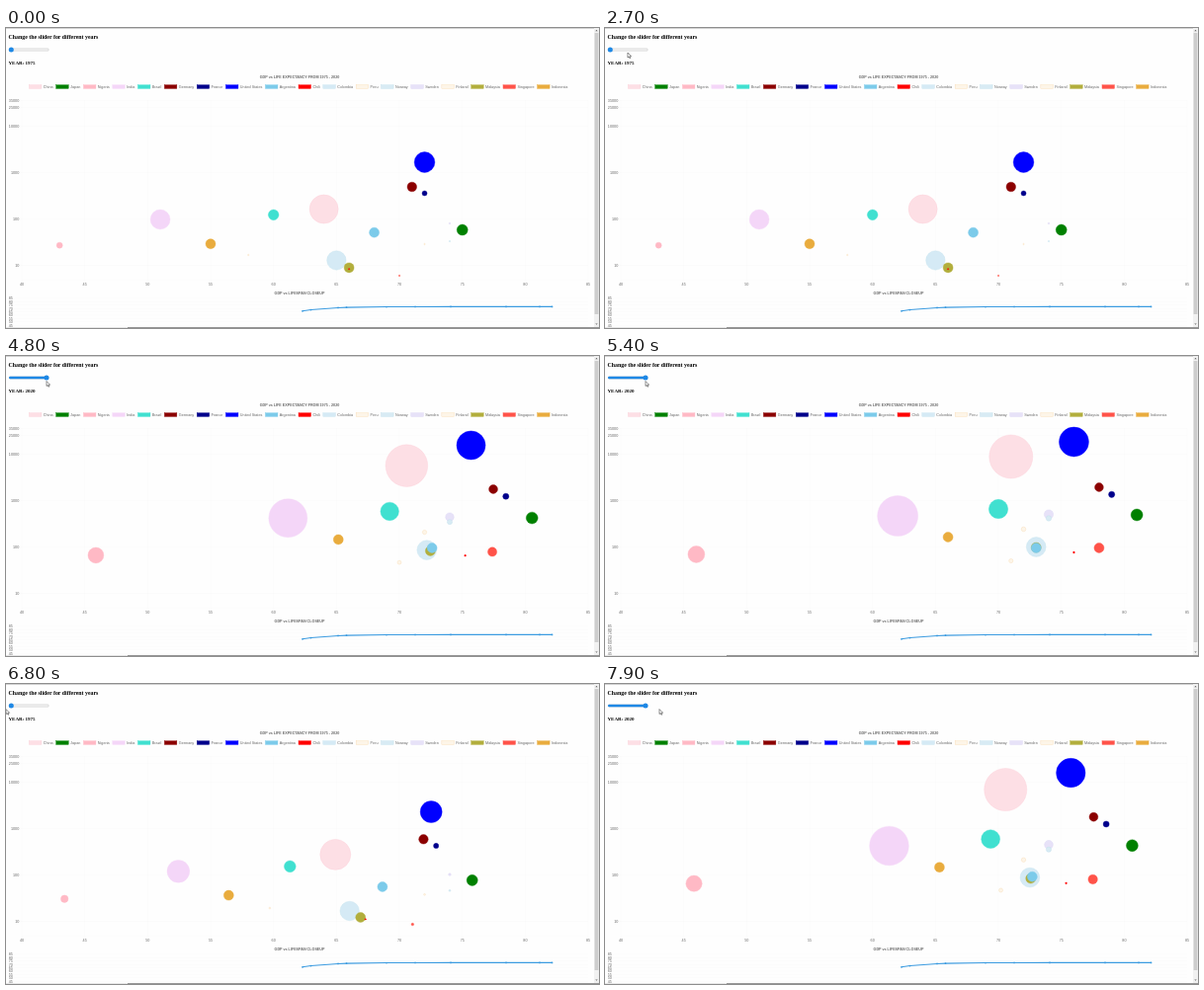
These frames come from a looping animation (600 by 304 pixels, 8000 ms). An HTML page:

```html
<!DOCTYPE html>
<html lang="en">
<head>
<meta charset="utf-8">
<title>GDP vs life expectancy</title>
<style>
html, body { margin: 0; width: 100%; height: 100%; overflow: hidden; background: #fefefe; }
svg { display: block; width: 600px; height: 304px; font: 3.75px "Liberation Sans", Arial, sans-serif; fill: #666; }
.head, .year { font: bold 5.88px "Liberation Serif", "Times New Roman", serif; fill: #000; }
.year { font-size: 5px; }
.title { font-weight: bold; font-size: 3.7px; text-anchor: middle; }
.mid { text-anchor: middle; }
.end { text-anchor: end; }
</style>
</head>
<body>
<svg id="stage" viewBox="0 0 600 304"></svg>
<script>
const LOOP = 8000;
const stage = document.getElementById('stage');

function add(tag, attrs, parent = stage) {
  const node = document.createElementNS('http://www.w3.org/2000/svg', tag);
  for (const key in attrs) node.setAttribute(key, attrs[key]);
  parent.append(node);
  return node;
}
function text(x, y, str, cls = '') {
  const node = add('text', { x, y, class: cls });
  node.textContent = str;
  return node;
}
const rect = (x, y, width, height, fill, more) => add('rect', { x, y, width, height, fill, ...more });
const line = (x1, y1, x2, y2) => add('line', { x1, y1, x2, y2, stroke: '#000', 'stroke-opacity': .04, 'stroke-width': .31 });

const lifeX = life => 16 + 12.735 * (life - 40);
const gdpY = gdp => 287.6 - 47.1 * Math.log10(gdp);
const mix = (a, b, p) => a + (b - a) * p;

// name, fill, border, then 1975 and 2020 values of life expectancy, GDP and radius,
// and optionally how far life and GDP have come by 1995
const countries = [
  ['China', '#fddfe5', '#fbcdd6', [64, 71], [162, 8730], [14.5, 22], [.53, .13]],
  ['Japan', '#008000', '', [75, 81], [58, 487], [5.5, 6]],
  ['Nigeria', '#ffb9c5', '', [43, 46], [27, 69], [3, 8.5], [.7, .6]],
  ['India', '#f4d6f8', '', [51, 62], [97, 464], [10, 20.5]],
  ['Brazil', '#40e0d0', '', [60, 70], [122, 653], [5.3, 9.7]],
  ['Germany', '#8b0000', '', [71, 78], [487, 1916], [4.8, 4.4]],
  ['France', '#00008b', '', [72, 79], [355, 1341], [2.5, 3.1]],
  ['United States', '#0000ff', '', [72, 76], [1655, 18155], [10.4, 15]],
  ['Argentina', '#7ccbea', '', [68, 73], [51, 95], [5, 5], [.37, .94]],
  ['Chili', '#ff0000', '', [66, 76], [8.3, 76], [.7, .9]],
  ['Colombia', '#d5eaf5', '#c5e2ee', [65, 73], [12.8, 99.6], [9.7, 9.9], [.2, .42]],
  ['Peru', '#fdf5e8', '#f7d9b0', [58, 71], [16.7, 50], [.7, 2.1]],
  ['Norway', '#d8ebf4', '#c0dfea', [74, 74], [33, 411], [.7, 2.7]],
  ['Sweden', '#e7e2f8', '#dad3f2', [74, 74], [80, 500], [.8, 4.6]],
  ['Finland', '#fdf5e8', '#f7d9b0', [72, 72], [28.6, 240], [.7, 2.3]],
  ['Malaysia', '#b2ae3c', '', [66, 73], [8.9, 97], [5, 5]],
  ['Singapore', '#ff5349', '', [70, 78], [6, 95], [.7, 5]],
  ['Indonesia', '#e9ac3e', '', [55, 66], [29, 162], [5, 5]]
];

// page frame
rect(0, 0, 600, .6, '#bbb');
rect(595, 0, 5, 304, '#f1f1f1');
rect(595.6, 5, 3.8, 285, '#cdcdcd');
add('path', { d: 'M596.3 3.2l1.2-1.4 1.2 1.4zM596.3 299.4l1.2 1.4 1.2-1.4z', fill: '#666' });
rect(0, 303, 600, 1, '#999');
rect(0, 303, 123, 1, '#e8e8e8');

// header and slider
text(2.5, 11.4, 'Change the slider for different years', 'head');
const yearLabel = text(2.5, 36.8, '', 'year');
rect(3, 20.75, 40.3, 2.5, '#efefef', { rx: 1.25, stroke: '#b2b2b2', 'stroke-width': .31 });
const filled = rect(3, 20.75, 2, 2.5, '#1e88e5', { rx: 1.25 });
const thumb = add('circle', { cy: 22, r: 2.5, fill: '#1e88e5' });

// bubble chart
text(297, 50.7, 'GDP vs LIFE EXPECTANCY FROM 1975 - 2020', 'title');
for (let life = 40; life <= 85; life += 5) {
  line(lifeX(life), 73, lifeX(life), 258);
  text(lifeX(life), 260.9, life, 'mid');
}
for (const gdp of [35000, 25000, 10000, 1000, 100, 10]) {
  line(13.5, gdpY(gdp), 589, gdpY(gdp));
  text(13.3, gdpY(gdp) + 1.4, gdp, 'end');
}
line(16, 255, 589, 255);

const layer = add('g', {});
let legendX = 23.4;
const bubbles = countries.map(([name, fill, border, life, gdp, radius, mid = [.4, .45]]) => {
  const paint = { fill, stroke: border || fill, 'stroke-width': .4 };
  rect(legendX, 57.7, 12.5, 3.7, fill, paint);
  const label = text(legendX + 14.4, 60.8, name);
  legendX += 17.5 + label.getComputedTextLength();
  const node = add('circle', paint, layer);
  layer.prepend(node);
  const attrs = { cx: life.map(lifeX), cy: gdp.map(gdpY), r: radius };
  return { name, node, attrs, mid: { cx: mid[0], cy: mid[1], r: .25 } };
});
layer.prepend(bubbles.find(b => b.name === 'Colombia').node);

// close-up line chart
text(297, 269.6, 'GDP vs LIFESPAN CLOSEUP', 'title');
for (let i = 0; i < 9; i++) {
  const y = 274 + 3.4 * i;
  line(7.5, y, 589, y);
  text(6.8, y + 1.3, 85 - 5 * i, 'end');
}
const points = [300, 308.5, 336, 344.5, 385, 414, 450, 506, 540, 552.5]
  .map(x => [x, 282.4 + 4.4 * Math.exp((300 - x) / 25)]);
add('polyline', { points: points.join(' '), fill: 'none', stroke: '#3b9be0', 'stroke-width': 1.1 });
for (const [cx, cy] of points) add('circle', { cx, cy, r: .9, fill: '#3b9be0' });

const cursor = add('path', {
  d: 'M0 0V5L1.2 4 2 5.8 2.8 5.4 2 3.7H3.6Z', fill: '#fff', stroke: '#222', 'stroke-width': .5
});

// the hand approaches, then drags sideways; the thumb follows it within the track
const approach = [[1300, 405, 299], [2000, 150, 118], [2200, 173, 178], [2700, 23, 25], [3000, 5, 22]];
const drag = [[3700, 5], [4300, 21], [4500, 27], [4700, 41], [6000, 41], [6200, 23.5], [6400, 3],
  [6800, 0], [7050, 0], [7450, 41], [7900, 55]];

function sample(keys, t) {
  const i = keys.findIndex(k => k[0] > t);
  if (i < 0) return keys.at(-1).slice(1);
  if (i === 0) return keys[0].slice(1);
  const a = keys[i - 1], b = keys[i];
  const p = (t - a[0]) / (b[0] - a[0]);
  return a.slice(1).map((v, j) => mix(v, b[j + 1], p));
}

const quartOut = p => 1 - (1 - Math.min(p, 1)) ** 4;

// progress from 1975 to 2020, given the share reached by 1995
function progress(t, mid) {
  if (t < 3700) return 0;
  if (t < 4300) return mid * (t - 3700) / 600;
  if (t < 6200) return mix(mid, 1, quartOut((t - 4300) / 1250));
  if (t < 6410) return mix(1, .95, (t - 6200) / 210);
  if (t < 7400) return .95 * (1 - quartOut((t - 6410) / 1000));
  return quartOut((t - 7400) / 1000);
}

function draw(t) {
  for (const { node, attrs, mid } of bubbles) {
    for (const key in attrs) node.setAttribute(key, mix(...attrs[key], progress(t, mid[key])));
  }
  const [hand] = sample(drag, t);
  const x = Math.min(41, Math.max(5.3, hand));
  yearLabel.textContent = 'YEAR: ' + Math.round(mix(1975, 2020, (x - 5.3) / 35.7));
  thumb.setAttribute('cx', x);
  filled.setAttribute('width', x - 3);
  const tip = t < 3700 ? sample(approach, t) : [hand, 25.5];
  cursor.setAttribute('visibility', t < 1300 ? 'hidden' : 'visible');
  cursor.setAttribute('transform', `translate(${tip})`);
}

const start = performance.now();
function tick() {
  draw((performance.now() - start) % LOOP);
  requestAnimationFrame(tick);
}
tick();
</script>
</body>
</html>
```
